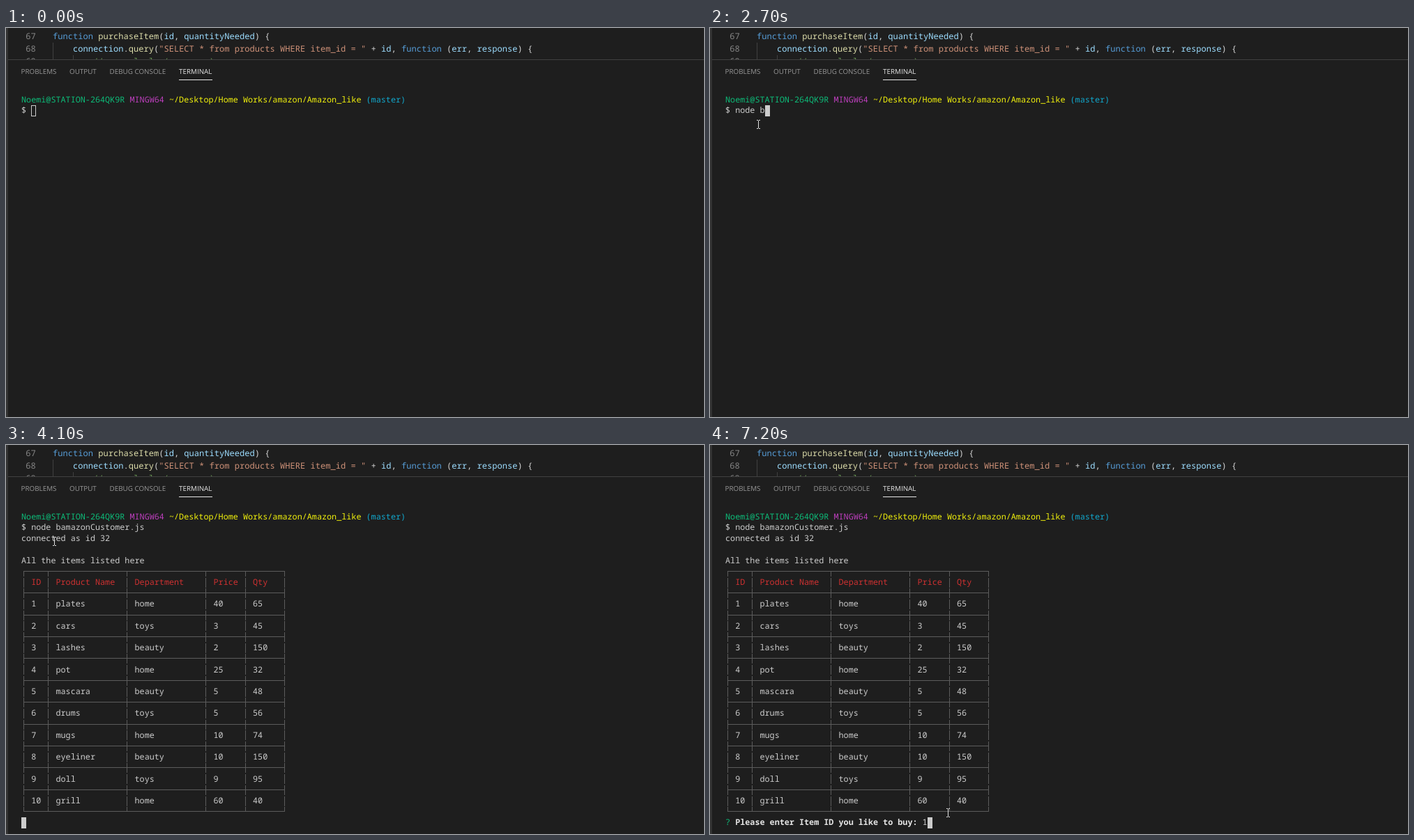
An HTML page with a canvas for the animation above (8 s loop, 1001 px wide and 559 px high).

```html
<!DOCTYPE html>
<html lang="en">
<head>
<meta charset="utf-8">
<title>Terminal session</title>
<style>
html, body { margin: 0; width: 100%; height: 100%; overflow: hidden; background: #1e1e1e; }
canvas { display: block; }
</style>
</head>
<body>
<canvas id="stage" width="1001" height="559"></canvas>
<script>
const ctx = document.getElementById('stage').getContext('2d');
const LOOP = 8000;
const MONO = '"Noto Sans Mono", "DejaVu Sans Mono", monospace';
const SANS = '"Open Sans", "Noto Sans", sans-serif';
const GRAY = '#cccccc', GREEN = '#0dbc79', RED = '#cd3131';
const CELL = 7.065, ROW = 15.7, LEFT = 22, TOP = 95.3;
const EDIT_CELL = 7.245;

// Editor colours
const KEY = '#569cd6', FN = '#dcdcaa', VAR = '#9cdcfe', STR = '#ce9178', OP = '#d4d4d4';

const tabs = [['PROBLEMS', 21.5], ['OUTPUT', 91], ['DEBUG CONSOLE', 148.5], ['TERMINAL', 248]];
const columns = [2, 7, 23, 39, 47];
const borders = [0, 5, 21, 37, 45, 53];
const items = `ID,Product Name,Department,Price,Qty
1,plates,home,40,65
2,cars,toys,3,45
3,lashes,beauty,2,150
4,pot,home,25,32
5,mascara,beauty,5,48
6,drums,toys,5,56
7,mugs,home,10,74
8,eyeliner,beauty,10,150
9,doll,toys,9,95
10,grill,home,60,40`.split('\n').map(line => line.split(','));

// Time and the command typed so far
const typing = [[0, ''], [1700, 'n'], [1800, 'no'], [2000, 'nod'], [2100, 'node'],
  [2400, 'node '], [2700, 'node b'], [2900, 'node bamazonCustomer.js ']];

// Pointer path: time, x, y
const path = [[400, 11, 14], [500, 130, 20], [600, 235, 49], [700, 178, 108], [800, 69, 138],
  [4700, 69, 138], [4800, 110, 168], [4900, 235, 330], [5000, 335, 413], [5100, 335, 413],
  [5200, 317, 494], [5300, 303, 520], [5400, 288, 529], [5600, 277, 526], [5900, 281, 518],
  [6000, 281, 518], [6100, 299, 518], [6200, 326, 524], [6300, 341, 528]];

function rect(color, x, y, w, h) {
  ctx.fillStyle = color;
  ctx.fillRect(x, y, w, h);
}

// Draws [text, colour] pairs on a fixed-width grid
function spans(parts, x, y, cell) {
  for (const [text, color] of parts) {
    ctx.fillStyle = color;
    for (const ch of text) {
      ctx.fillText(ch, x, y);
      x += cell;
    }
  }
}

function print(row, col, ...parts) {
  spans(parts, LEFT + col * CELL, TOP + 11.4 + row * ROW, CELL);
}

function setMono(cell, weight = '') {
  ctx.font = `${weight} ${cell / 0.6}px ${MONO}`;
}

function drawEditor() {
  ctx.save();
  ctx.beginPath();
  ctx.rect(0, 0, 1001, 45);
  ctx.clip();
  setMono(EDIT_CELL);
  rect('#404040', 67, 21, 1, 24);
  rect('#404040', 96, 39, 1, 6);
  const code = [
    [['function ', KEY], ['purchaseItem', FN], ['(', OP], ['id', VAR], [', ', OP],
      ['quantityNeeded', VAR], [') {', OP]],
    [['    connection', VAR], ['.', OP], ['query', FN], ['(', OP],
      ['"SELECT * from products WHERE item_id = "', STR], [' + ', OP], ['id', VAR], [', ', OP],
      ['function', KEY], [' (', OP], ['err', VAR], [', ', OP], ['response', VAR], [') {', OP]],
    [['        // console.log(response);', '#6a9955']]
  ];
  code.forEach((parts, i) => {
    const y = 15.9 + i * 17.9;
    spans([[String(67 + i), '#858585']], 28.3, y, EDIT_CELL);
    spans(parts, 67, y, EDIT_CELL);
  });
  ctx.restore();
}

function drawTabs() {
  rect('#414141', 3, 45, 998, 1);
  ctx.font = `9.85px ${SANS}`;
  tabs.forEach(([label, x], i) => {
    ctx.fillStyle = i === 3 ? '#e7e7e7' : '#979797';
    ctx.fillText(label, x, 65.8);
  });
  rect('#e7e7e7', 248, 74, 48, 1);
}

function drawTable() {
  const xs = borders.map(c => Math.floor(LEFT + (c + 0.5) * CELL));
  const line = '#5c5c5c';
  for (let row = 5; row <= 27; row++) {
    const y = Math.round(TOP + row * ROW);
    if (row % 2) rect(line, xs[0], y + 7, xs[5] - xs[0] + 1, 1);
    const from = row === 5 ? 7 : 1, to = row === 27 ? 8 : 15;
    for (const x of xs) rect(line, x, y + from, 1, to - from);
  }
  items.forEach((cells, i) => cells.forEach((text, c) =>
    print(6 + 2 * i, columns[c], [text, i ? GRAY : RED])));
}

function drawCursor(row, col, hollow) {
  const x = Math.round(LEFT + col * CELL), y = Math.round(TOP + row * ROW);
  if (hollow) {
    ctx.strokeStyle = GRAY;
    ctx.strokeRect(x + 0.5, y + 0.5, 6, 15);
  } else rect(GRAY, x, y, 7, 16);
}

function drawTerminal(t) {
  setMono(CELL);
  print(0, 0, ['Noemi@STATION-264QK9R ', GREEN], ['MINGW64 ', '#bc3fbc'],
    ['~/Desktop/Home Works/amazon/Amazon_like ', '#f2f20c'], ['(master)', '#11a8cd']);
  const command = typing.filter(step => step[0] <= t).pop()[1];
  print(1, 0, ['$ ' + command, GRAY]);
  let row = 1, col = 2 + command.length;
  if (t >= 3500) [row, col] = [2, 0];
  if (t >= 3900) {
    print(2, 0, ['connected as id 32', GRAY]);
    print(4, 0, ['All the items listed here', GRAY]);
    row = 5;
  }
  if (t >= 4100) {
    drawTable();
    row = 28;
  }
  if (t >= 4200) {
    const answer = t >= 7200 ? '1' : '';
    print(28, 0, ['?', GREEN]);
    print(28, 40, [answer, GRAY]);
    setMono(CELL, 'bold');
    print(28, 2, ['Please enter Item ID you like to buy:', '#e5e5e5']);
    col = 40 + answer.length;
  }
  drawCursor(row, col, t < 800);
}

function pointerAt(t) {
  const i = path.findIndex(p => p[0] > t);
  if (i < 0) return path[path.length - 1].slice(1);
  const [t0, x0, y0] = path[i - 1], [t1, x1, y1] = path[i];
  const k = (t - t0) / (t1 - t0);
  return [Math.round(x0 + (x1 - x0) * k), Math.round(y0 + (y1 - y0) * k)];
}

function drawPointer(t) {
  if (t < path[0][0]) return;
  const [x, y] = pointerAt(t);
  const color = '#e0e0e0';
  rect(color, x, y - 5, 1, 11);
  for (const end of [y - 6, y + 6]) {
    rect(color, x - 2, end, 2, 1);
    rect(color, x + 1, end, 2, 1);
  }
}

function frame() {
  const t = Math.floor(performance.now() % LOOP / 100) * 100;
  ctx.textRendering = 'geometricPrecision';
  rect('#1e1e1e', 0, 0, 1001, 559);
  rect('#333333', 0, 0, 3, 559);
  drawEditor();
  drawTabs();
  drawTerminal(t);
  drawPointer(t);
  requestAnimationFrame(frame);
}
frame();
</script>
</body>
</html>
```
